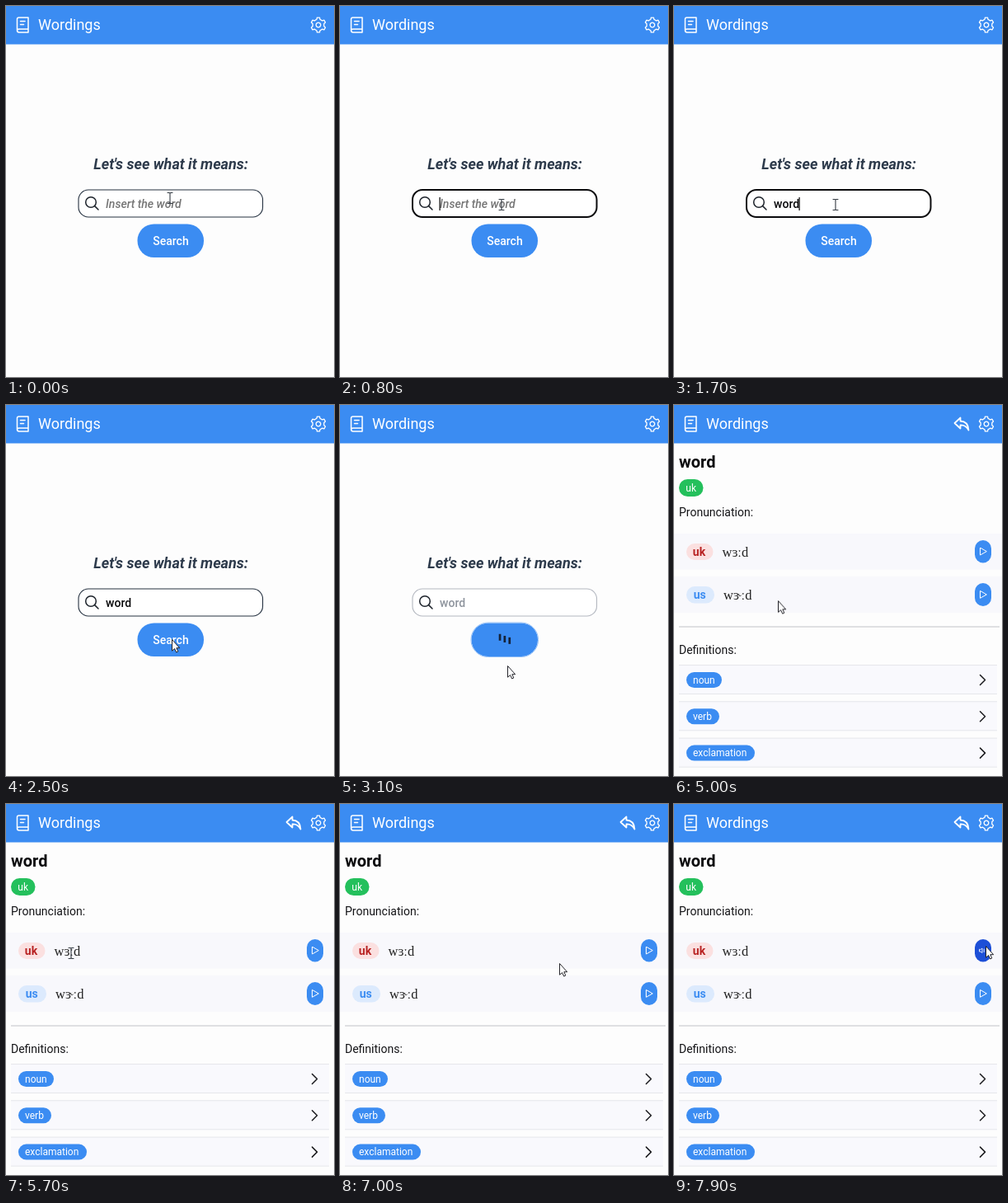
These frames come from a looping animation (398 by 450 pixels, 8000 ms). An HTML page:

```html
<!DOCTYPE html>
<html lang="en">
<head>
<meta charset="utf-8">
<title>Dictionary popup</title>
<style>
  html, body { margin: 0; width: 100%; height: 100%; overflow: hidden; background: #fdfdfd; }
  svg { display: block; font-family: Roboto, Arial, sans-serif; font-size: 14px; }
  .line { fill: none; stroke-linecap: round; stroke-linejoin: round; }
  .mid { text-anchor: middle; }
  .medium { font-weight: 500; }
  .bold { font-weight: 700; }
  .ipa { font: 16.5px "Liberation Serif", serif; fill: #222; }
  .tag { font-size: 12px; fill: #fff; }

  /* One 8 s clock; hard switches use step-end. */
  .step { animation: 8s step-end infinite; }
  .home { animation-name: home; }
  .result { animation-name: result; }
  .hint { animation-name: hint; }
  .field { animation-name: field; }
  .typed { animation-name: typed; }
  .reveal { animation-name: reveal; }
  .caret { animation-name: blink, advance; }
  .label { animation-name: label; }
  .busy { animation-name: busy; }
  .press { animation-name: press; }
  .idle { animation-name: idle; }
  .sound { animation-name: sound; }
  .arrow { animation-name: arrow; }
  .beam { animation-name: beam; }
  .hand { animation-name: hand; }
  .pointer { animation: travel 8s ease-in-out infinite; }
  .bar { animation: bounce .8s ease-in-out infinite; }
  .bar:nth-child(2) { animation-delay: .1s; }
  .bar:nth-child(3) { animation-delay: .18s; }

  @keyframes home { 0% { visibility: visible } 46.25%, 100% { visibility: hidden } }
  @keyframes result { 0% { visibility: hidden } 46.25%, 100% { visibility: visible } }
  @keyframes hint { 0% { opacity: 1 } 12.5%, 100% { opacity: 0 } }
  @keyframes field {
    0% { stroke: #263241; stroke-width: 1.1px }
    5% { stroke: #0b0b0d; stroke-width: 2px }
    31.25% { stroke: #263241; stroke-width: 1.1px }
    32.5%, 100% { stroke: #b4b8c0; stroke-width: 1.1px }
  }
  @keyframes typed { 0% { fill: #0b0b0d } 32.5%, 100% { fill: #8f959e } }
  @keyframes reveal {
    0% { width: 0 } 12.5% { width: 11.5px } 15% { width: 19.5px }
    16.25% { width: 24.5px } 18.75%, 100% { width: 36px }
  }
  @keyframes advance {
    0% { transform: none } 12.5% { transform: translateX(10.5px) } 15% { transform: translateX(18.5px) }
    16.25% { transform: translateX(23.5px) } 18.75%, 100% { transform: translateX(31px) }
  }
  @keyframes blink { 0% { opacity: 0 } 5% { opacity: 1 } 25% { opacity: 0 } 31.25%, 100% { opacity: 0 } }
  @keyframes label { 0% { opacity: 1 } 32.5%, 100% { opacity: 0 } }
  @keyframes busy { 0% { opacity: 0 } 32.5%, 100% { opacity: 1 } }
  @keyframes press { 0% { fill: #3b8cf2 } 95%, 100% { fill: #1d4fd7 } }
  @keyframes idle { 0% { opacity: 1 } 97.5%, 100% { opacity: 0 } }
  @keyframes sound { 0% { opacity: 0 } 97.5%, 100% { opacity: 1 } }
  @keyframes bounce { 0%, 100% { transform: translateY(-3px) } 50% { transform: translateY(3px) } }
  @keyframes beam {
    0% { opacity: 1 } 26.25% { opacity: 0 } 65% { opacity: 1 } 73.75% { opacity: 0 }
    75% { opacity: 1 } 81.25%, 100% { opacity: 0 }
  }
  @keyframes hand { 0% { opacity: 0 } 46.25% { opacity: 1 } 58.75%, 100% { opacity: 0 } }
  @keyframes arrow {
    0% { opacity: 0 } 26.25% { opacity: 1 } 46.25% { opacity: 0 } 58.75% { opacity: 1 }
    65% { opacity: 0 } 73.75% { opacity: 1 } 75% { opacity: 0 } 81.25%, 100% { opacity: 1 }
  }
  @keyframes travel {
    0% { transform: translate(199px, 233px) }
    3.75%, 23.75% { transform: translate(196px, 241px) }
    29%, 32.5% { transform: translate(201px, 285px) }
    36.25%, 40% { transform: translate(203px, 317px) }
    44%, 57.5% { transform: translate(204px, 333px) }
    66.25%, 72.5% { transform: translate(79px, 181px) }
    76.25%, 80% { transform: translate(84px, 231px) }
    86.25%, 91.25% { transform: translate(266px, 194px) }
    95%, 100% { transform: translate(378px, 173px) }
  }
</style>
</head>
<body>
<svg width="398" height="450" viewBox="0 0 398 450">
  <defs>
    <clipPath id="typing"><rect class="step reveal" x="120" y="228" width="0" height="24"/></clipPath>
    <path id="play" class="line" d="M371.5 173.5V182l7.5-4.2z" stroke="#fff"/>
    <g id="row">
      <rect x="6" y="315" width="386" height="36" fill="#f9f9fd"/>
      <path d="M6 315.5H392M6 350.5H392" stroke="#e6e7eb"/>
      <path class="line" d="M371.5 327.5l6 6-6 6" stroke="#1c1c20" stroke-width="1.5"/>
    </g>
  </defs>

  <rect width="398" height="450" fill="#fdfdfd"/>

  <!-- header -->
  <rect width="398" height="46.5" fill="#3b8cf2"/>
  <g class="line" stroke="#fff" stroke-width="1.5">
    <path d="M27 28V14H15.5Q13.5 14 13.5 16V29.5Q13.5 32 16 32H27V28H16Q13.5 28 13.5 30M17.5 18.5H23M17.5 22.5H21.5"/>
    <g transform="translate(379 23)" stroke-width="1.3">
      <path d="M-2.05-6.7L-1.6-8.9H1.6L2.05-6.7 4.78-5.13 6.9-5.84 8.5-3.06 6.83-1.57V1.57L8.5 3.06 6.9 5.84 4.78 5.13 2.05 6.7 1.6 8.9H-1.6L-2.05 6.7-4.78 5.13-6.9 5.84-8.5 3.06-6.83 1.57V-1.57L-8.5-3.06-6.9-5.84-4.78-5.13z"/>
      <circle r="2.8"/>
    </g>
  </g>
  <text x="39" y="29" font-size="18" fill="#fff">Wordings</text>

  <!-- search page -->
  <g class="step home">
    <text class="mid bold" x="200" y="198" font-size="18" font-style="italic" fill="#2d3a4b">Let's see what it means:</text>
    <rect class="step field" x="88" y="223" width="223.5" height="33" rx="12" fill="#fff"/>
    <g class="line" stroke="#1d232b" stroke-width="1.5">
      <circle cx="103" cy="238" r="6.3"/>
      <path d="M107.6 242.6l4.4 4.4"/>
    </g>
    <text class="medium step hint" x="121" y="245" font-style="italic" fill="#757575">Insert the word</text>
    <g clip-path="url(#typing)"><text class="medium step typed" x="121" y="245">word</text></g>
    <rect class="step caret" x="120.5" y="232" width="1.2" height="16"/>

    <rect x="159.5" y="264.5" width="80.5" height="40.5" rx="20" fill="#3b8cf2"/>
    <text class="mid medium step label" x="200" y="290" fill="#fff">Search</text>
    <g class="step busy">
      <rect x="159" y="264" width="81.5" height="41.5" rx="20.5" fill="none" stroke="#8fbdf7"/>
      <g fill="#15233a">
        <rect class="bar" x="192.7" y="280" width="2.7" height="8"/>
        <rect class="bar" x="198.5" y="280" width="2.7" height="8"/>
        <rect class="bar" x="204.4" y="280" width="2.7" height="8"/>
      </g>
    </g>
  </g>

  <!-- result page -->
  <g class="step result">
    <path class="line" d="M347.5 15.5L340.5 22l7 6.5V24.5Q354 24 357.5 30.5 357 20 347.5 19.5z" stroke="#fff" stroke-width="1.8"/>
    <text class="bold" x="6" y="76" font-size="20" fill="#0b0b0d">word</text>
    <rect x="6" y="90" width="29.5" height="21" rx="10.5" fill="#24c05c"/>
    <text class="mid tag" x="20.7" y="104.5">uk</text>
    <text x="6" y="134.5" fill="#151518">Pronunciation:</text>

    <rect y="156" width="398" height="43.5" fill="#f8f8fc"/>
    <rect x="15" y="168" width="32.5" height="20" rx="10" fill="#fbe0e0"/>
    <text class="mid bold" x="30.5" y="183" fill="#b82323">uk</text>
    <text class="ipa" x="58.5" y="184">wɜːd</text>
    <rect class="step press" x="365" y="164" width="20" height="27.5" rx="10"/>
    <use href="#play" class="step idle"/>
    <path class="line step sound" d="M370.5 176.5v2.5h1.5l2 1.5v-5.5l-2 1.5zM376.2 176v3.5M378.5 175v5.5" stroke="#d5e2fb"/>

    <rect y="208" width="398" height="44" fill="#f8f8fc"/>
    <rect x="15" y="220" width="34" height="20.5" rx="10" fill="#dceafd"/>
    <text class="mid bold" x="31.3" y="235" fill="#3b8cf2">us</text>
    <text class="ipa" x="60" y="236">wɝːd</text>
    <rect x="365" y="216" width="20" height="28" rx="10" fill="#3b8cf2"/>
    <use href="#play" y="52.3"/>

    <path d="M6 269H395" stroke="#d6d7da" stroke-width="1.3"/>
    <text x="6" y="301.5" fill="#151518">Definitions:</text>
    <use href="#row"/>
    <use href="#row" y="44.3"/>
    <use href="#row" y="88.6"/>
    <g fill="#3b8cf2">
      <rect x="15" y="324" width="43" height="19" rx="9.5"/>
      <rect x="15" y="368.3" width="40" height="19" rx="9.5"/>
      <rect x="15" y="412.6" width="83" height="19" rx="9.5"/>
    </g>
    <g class="tag">
      <text x="23" y="337.5">noun</text>
      <text x="23" y="381.8">verb</text>
      <text x="23" y="426">exclamation</text>
    </g>
  </g>

  <!-- mouse pointer, hotspot at 0,0 -->
  <g class="pointer">
    <path class="line step beam" d="M-3-6.5H-1L0-6 1-6.5H3M0-6V6M-3 6.5H-1L0 6 1 6.5H3" stroke="#333a42" stroke-width="1.1"/>
    <path class="step arrow" d="M.5-.5V13.2L3.6 10.5 5.7 15 7.8 14 5.8 9.7H9.7z" fill="#fff" stroke="#25252b" stroke-linejoin="round"/>
    <path class="step hand" d="M-1 10V1Q-1-.5 .4-.5T1.8 1V6.5Q4 5.5 4.5 7.2 6.4 6.3 7 8 9 7.4 9 9.5V13Q9 15.5 7.5 17V18.5H0V17L-3.5 11.5Q-4.5 9.5-3.3 9-2.3 8.7-1 10.8zM1.8 7V9.5M4.5 7.5V9.8M7 8.3V10" fill="#fff" stroke="#25252b" stroke-linejoin="round"/>
  </g>
</svg>
</body>
</html>
```
